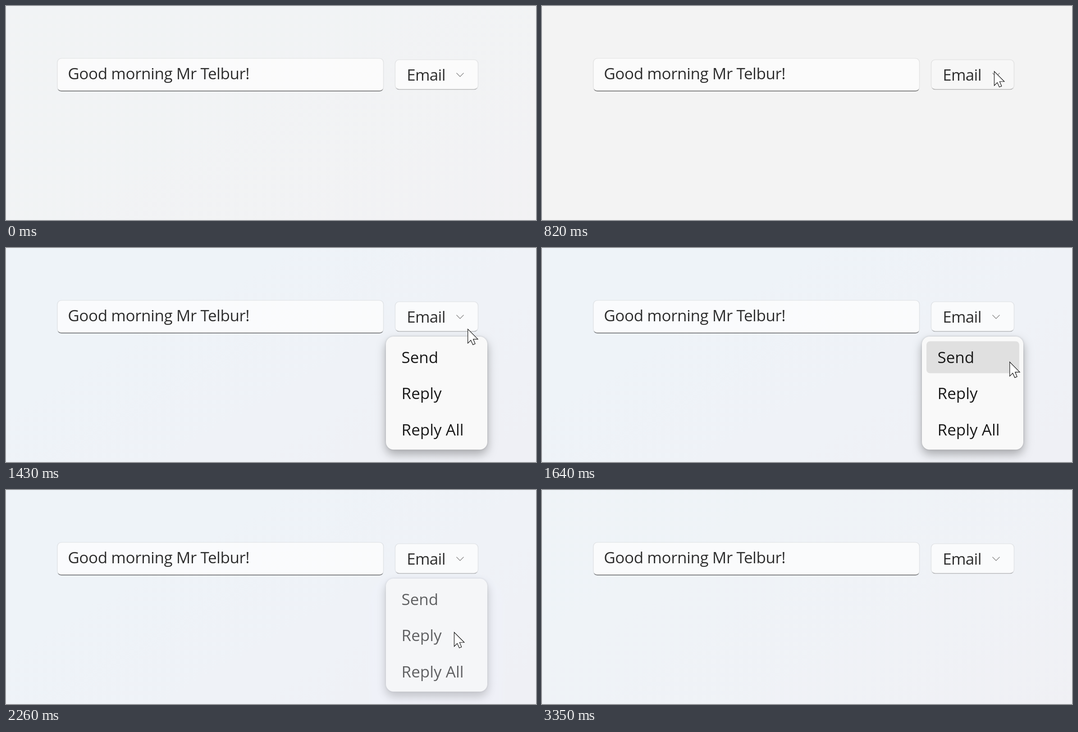
Animation of 1176x476 px, one loop 3.41 s. Source, as an HTML page:

```html
<!DOCTYPE html>
<html lang="en">
<head>
<meta charset="utf-8">
<title>Email drop-down</title>
<style>
  html, body { margin: 0; width: 100%; height: 100%; overflow: hidden; background: #f3f3f3; }
  svg { display: block; width: 100%; height: 100%; }
  text { font-family: "Open Sans", "Noto Sans", sans-serif; font-size: 35px; fill: #2e2e2e; }
  #items text { fill: #1a1a1a; }
  #panel { filter: drop-shadow(0 10px 11px rgba(0, 0, 0, .27)) drop-shadow(0 0 2px rgba(0, 0, 0, .16)); }
  #glow { filter: blur(3px); }
</style>
</head>
<body>
<svg viewBox="0 0 1176 476">
  <defs>
    <linearGradient id="tint" gradientUnits="userSpaceOnUse" x1="560" y1="-187" x2="979" y2="532">
      <stop offset=".15" stop-color="#eef3f8"/>
      <stop offset=".65" stop-color="#eff2f7"/>
      <stop offset="1" stop-color="#eff0f5"/>
    </linearGradient>
    <linearGradient id="fieldEdge" gradientUnits="userSpaceOnUse" x1="0" y1="184" x2="0" y2="188.5">
      <stop offset="0" stop-opacity=".07"/>
      <stop offset="1" stop-opacity=".54"/>
    </linearGradient>
    <linearGradient id="buttonEdge" gradientUnits="userSpaceOnUse" x1="0" y1="181" x2="0" y2="185">
      <stop offset="0" stop-opacity=".07"/>
      <stop offset="1" stop-opacity=".27"/>
    </linearGradient>
    <clipPath id="reveal"><rect id="window" x="843" y="197" width="225" rx="17"/></clipPath>
  </defs>

  <rect width="1176" height="476" fill="#f3f3f3"/>
  <rect id="mica" width="1176" height="476" fill="url(#tint)"/>
  <rect id="glow" x="808" y="191" width="295" height="400" rx="60" fill="#eff2fc"/>

  <rect x="114" y="116.5" width="723.5" height="72.7" rx="9" fill="#fff" fill-opacity=".7" stroke="url(#fieldEdge)" stroke-width="1.7"/>
  <text x="137.3" y="163" letter-spacing="-.45">Good morning Mr Telbur!</text>

  <rect id="button" x="863.5" y="119.5" width="184" height="66" rx="9" fill="#fff" stroke="url(#buttonEdge)" stroke-width="1.7"/>
  <text id="label" x="889.2" y="165.5" letter-spacing="-.7">Email</text>
  <path id="chevron" d="M999.5 149l8 8 8-8" fill="none" stroke="#8c8c8c" stroke-width="1.4"/>

  <g id="menu">
    <rect id="panel" x="843" y="197" width="225" rx="17" fill="#f9f9f9"/>
    <g clip-path="url(#reveal)">
      <g id="items"><rect id="hover" x="853" width="206" height="71" rx="8"/></g>
    </g>
  </g>

  <path id="cursor" d="M.5 .5V32L7.2 25.3 11.8 35.3 16.8 33.1 12.5 23H22.8Z" fill="#fff" stroke="#111" stroke-width="1.2"/>
</svg>
<script>
const LOOP = 3410, STEP = 70;
const MENU_TOP = 197, MENU_HEIGHT = 251.5, ROW = 80.5, ROW_TOP = 207.5;
const el = id => document.getElementById(id);
const set = (id, attrs) => {
  for (const name in attrs) el(id).setAttribute(name, attrs[name]);
};

['Send', 'Reply', 'Reply All'].forEach((name, i) => {
  const item = document.createElementNS('http://www.w3.org/2000/svg', 'text');
  item.setAttribute('x', 877.5);
  item.setAttribute('y', ROW_TOP + ROW * i + 48);
  item.textContent = name;
  el('items').append(item);
});

// Progress from 0 to 1, advancing in even steps of about STEP ms.
function ramp(t, from, to) {
  const count = Math.round((to - from) / STEP);
  const u = Math.min(1, Math.max(0, (t - from) / (to - from)));
  return Math.floor(u * count + 1e-6) / count;
}
const easeIn = power => u => u ** power;
const easeOut = power => u => 1 - (1 - u) ** power;
const mix = (a, b, u) => a + (b - a) * u;

// Pointer moves: each curves from a to b, pulled towards bend.
const entry = [1072, 422], rest = [1003, 145], below = [1042, 209], pick = [994, 316], exit = [1104, 446];
const midway = (a, b) => a.map((v, i) => (v + b[i]) / 2);
const moves = [
  { from: 470, to: 820, a: entry, b: rest, bend: [862, 175], ease: easeOut(1.3) },
  { from: 1290, to: 1500, a: rest, b: below, bend: midway(rest, below), ease: easeIn(1.5) },
  { from: 1500, to: 1860, a: below, b: pick, bend: [1040, 296], ease: easeOut(1.5) },
  { from: 2530, to: 2810, a: pick, b: exit, bend: midway(pick, exit), ease: easeIn(3) }
];

function pointer(t) {
  const { from, to, a, b, bend, ease } = moves.filter(m => m.from <= t).pop() || moves[0];
  const u = ease(ramp(t, from, to));
  return a.map((v, i) => mix(mix(v, bend[i], u), mix(bend[i], b[i], u), u));
}

function draw(t) {
  const [x, y] = pointer(t);
  const shown = t >= 470 && t < 2880;
  const pressed = t >= 1020 && t < 1090;
  const over = t >= 750 && t < 1160;
  const open = easeOut(3)(ramp(t, 1090, 1360));
  const fade = 1 - ramp(t, 2190, 2400);
  const active = t < 470 ? .35 : ramp(t, 1020, 1230) - .15 * ramp(t, 3210, 3350);

  set('mica', { opacity: active });
  set('glow', { opacity: t < 3280 ? 1 - fade : 0 });
  set('cursor', { transform: `translate(${x} ${y})`, visibility: shown ? 'visible' : 'hidden' });

  set('button', { 'fill-opacity': pressed ? .15 : over ? .3 : .7 });
  el('label').style.fill = pressed ? '#626262' : '';
  set('chevron', { transform: `translate(0 ${pressed ? 3 : 0})` });

  const height = MENU_HEIGHT * mix(.5, 1, open);
  set('menu', { opacity: open > 0 ? fade : 0 });
  set('panel', { height });
  set('window', { height });
  set('items', { transform: `translate(0 ${height - MENU_HEIGHT})` });

  set('hover', {
    y: ROW_TOP + ROW * Math.floor((y - ROW_TOP) / ROW),
    fill: t >= 2060 ? '#ebebeb' : '#e0e0e0',
    opacity: t >= 1570 && fade === 1 ? 1 : 0
  });
}

const start = performance.now();
function tick() {
  draw((performance.now() - start) % LOOP);
  requestAnimationFrame(tick);
}
tick();
</script>
</body>
</html>
```
